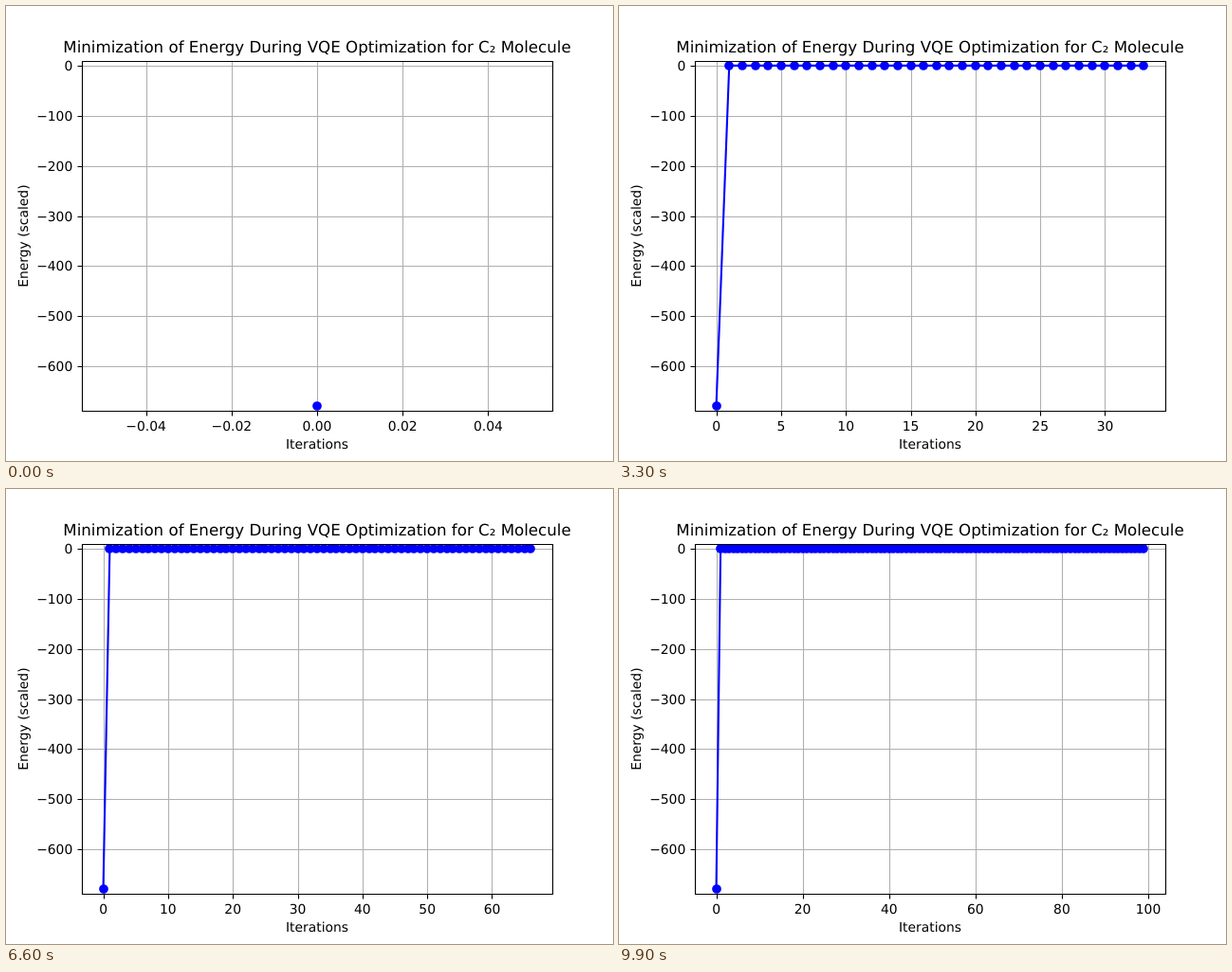
Recreate the animation shown at these times as an HTML page. Size 640 by 480 pixels, loop 10 s.

```html
<!DOCTYPE html>
<html lang="en">
<head>
<meta charset="utf-8">
<title>Energy minimization</title>
<style>
  html, body { margin: 0; width: 100%; height: 100%; overflow: hidden; background: #fff; }
  svg { display: block; }
  text { font-family: "DejaVu Sans", sans-serif; font-size: 13.889px; text-rendering: geometricPrecision; }
  .mid { text-anchor: middle; }
  .end { text-anchor: end; }
  path { fill: none; }
  .grid { stroke: #b0b0b0; stroke-width: 1.11; }
  .axis { stroke: #000; stroke-width: 1.11; }
  .data { stroke: #00f; stroke-width: 2.083; stroke-linejoin: round; stroke-linecap: square; }
  .dots { stroke: #00f; stroke-width: 9.72; stroke-linecap: round; }
</style>
</head>
<body>
<svg width="640" height="480" viewBox="0 0 640 480">
  <clipPath id="plot"><rect x="80" y="58" width="496" height="369"/></clipPath>
  <g clip-path="url(#plot)">
    <path class="grid" id="gridX"/>
    <path class="grid" id="gridY"/>
    <path class="data" id="line"/>
    <path class="dots" id="dots"/>
  </g>
  <path class="axis" id="ticksX"/>
  <path class="axis" id="ticksY"/>
  <path class="axis" stroke-linecap="square" d="M80.5 58.5H576.5V427.5H80.5Z"/>
  <g class="mid" id="labelsX"></g>
  <g class="end" id="labelsY"></g>
  <text class="mid" x="328" y="49" style="font-size:16.667px">Minimization of Energy During VQE Optimization for C₂ Molecule</text>
  <text class="mid" x="328" y="467">Iterations</text>
  <text class="mid" transform="translate(23 242.6) rotate(-90)">Energy (scaled)</text>
</svg>
<script>
const LEFT = 80, WIDTH = 496, TOP = 57.6, HEIGHT = 369.6;
const Y_MAX = 10, Y_SPAN = 698.8, FIRST_ENERGY = -678.8;
const STEP_MS = 100, STEPS = 100;

const $ = id => document.getElementById(id);
const setPath = (id, d) => $(id).setAttribute('d', d);
const snap = v => Math.floor(v + 0.5) + 0.5;
const label = (x, y, s) => `<text x="${x}" y="${y}">${s.replace('-', '\u2212')}</text>`;
const yPos = v => TOP + (Y_MAX - v) / Y_SPAN * HEIGHT;

// Smallest "nice" step that leaves at most nine intervals.
function niceStep(span) {
  const raw = span / 9;
  const scale = 10 ** Math.floor(Math.log10(raw));
  const factor = [1, 2, 2.5, 5, 10].find(f => f * scale >= raw - 1e-9);
  return { step: factor * scale, decimals: Math.max(0, -Math.floor(Math.log10(scale) + 1e-9) + (factor === 2.5 ? 1 : 0) - (factor === 10 ? 1 : 0)) };
}

function drawYAxis() {
  let grid = '', ticks = '', labels = '';
  for (let v = 0; v >= -600; v -= 100) {
    const y = snap(yPos(v));
    grid += `M80 ${y}H576`;
    ticks += `M80.5 ${y}H75.5`;
    labels += label(70.28, y + 4.5, String(v));
  }
  setPath('gridY', grid);
  setPath('ticksY', ticks);
  $('labelsY').innerHTML = labels;
}

function draw(n) {
  const lo = n ? -0.05 * n : -0.055;
  const hi = n ? 1.05 * n : 0.055;
  const xPos = v => LEFT + (v - lo) / (hi - lo) * WIDTH;
  const { step, decimals } = niceStep(hi - lo);

  let grid = '', ticks = '', labels = '';
  for (let i = Math.ceil(lo / step); i * step <= hi; i++) {
    const x = xPos(i * step), sx = snap(x);
    grid += `M${sx} 57V428`;
    ticks += `M${sx} 427.5V432.5`;
    labels += label(x, 448, (i * step).toFixed(decimals));
  }
  setPath('gridX', grid);
  setPath('ticksX', ticks);
  $('labelsX').innerHTML = labels;

  let line = '', dots = '';
  for (let i = 0; i <= n; i++) {
    const x = xPos(i), y = yPos(i ? 0 : FIRST_ENERGY);
    line += `${i ? 'L' : 'M'}${x} ${y}`;
    dots += `M${Math.round(x)} ${Math.round(y)}h0`;
  }
  setPath('line', n ? line : '');
  setPath('dots', dots);
}

let start, shown = -1;
function tick(now) {
  start ??= now;
  const n = Math.floor((now - start) / STEP_MS) % STEPS;
  if (n !== shown) draw(shown = n);
  requestAnimationFrame(tick);
}

drawYAxis();
draw(0);
requestAnimationFrame(tick);
</script>
</body>
</html>
```
